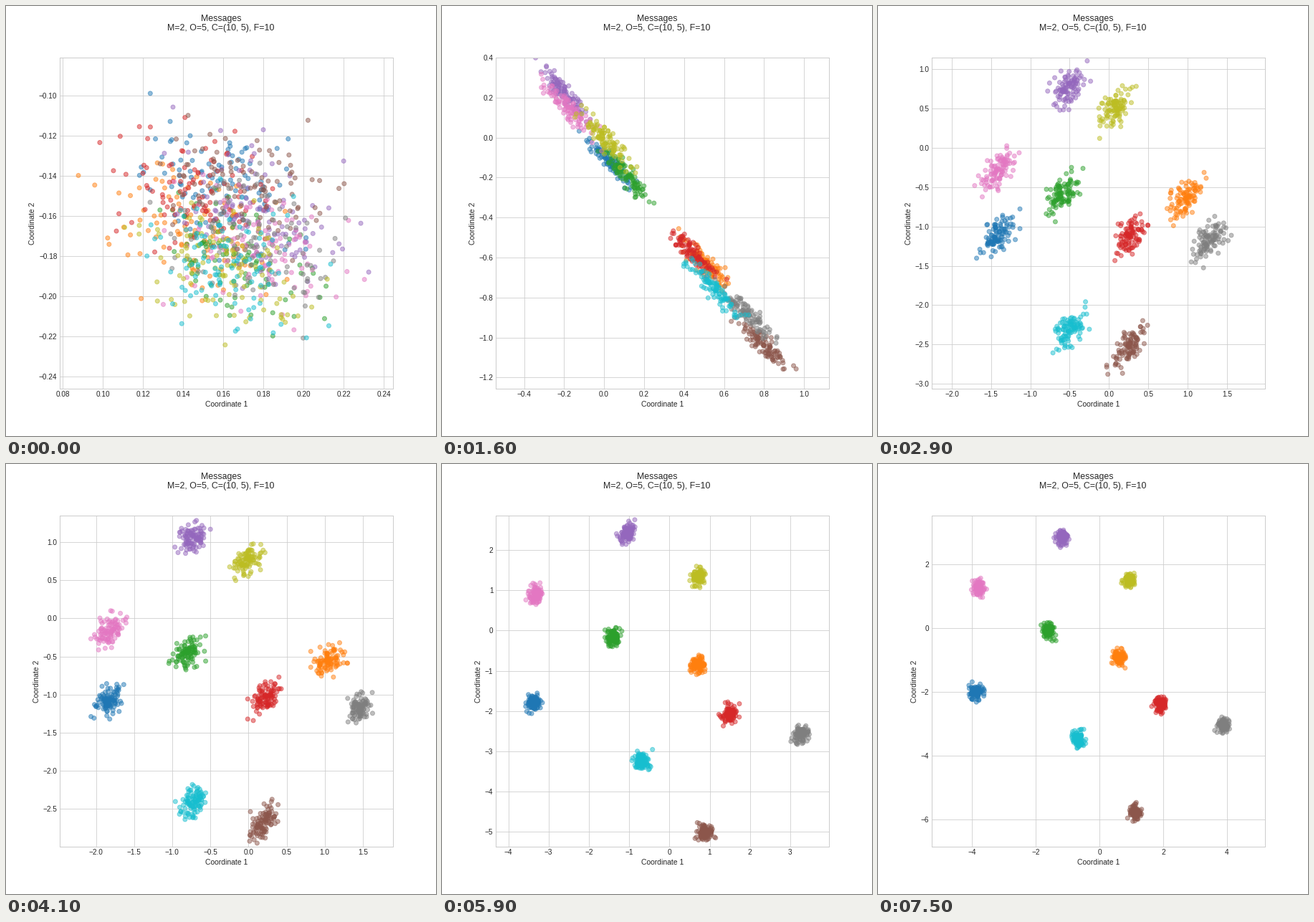
A matplotlib script for the animation above (7600 ms loop, 600x600 px).

```python
import numpy as np
import matplotlib.pyplot as plt
from matplotlib.animation import FuncAnimation

plt.rcParams.update({
    "font.family": "Liberation Sans",
    "font.size": 10,
    "text.color": ".15",
    "axes.labelcolor": ".15",
    "axes.labelsize": 10.4,
    "axes.edgecolor": ".8",
    "axes.linewidth": 1,
    "axes.axisbelow": True,
    "axes.grid": True,
    "grid.color": ".8",
    "grid.linewidth": 0.8,
    "xtick.color": ".15",
    "ytick.color": ".15",
    "xtick.major.size": 0,
    "ytick.major.size": 0,
    "xtick.major.pad": 2.6,
})

FRAMES, INTERVAL = 76, 100
PER_CLASS = 100
HALF = np.array([232.5, 231.0])   # half of the axes size in pixels
SPREAD, LATE, END = 29, 41, 75    # clusters apart, clusters tight, last step

# step, pixels per unit, view centre, cluster sd x, sd y (pixels), correlation
STAGES = np.array([
    (0, 2800, .16149, -.16357, 55, 46, -.3),
    (8, 2344, .22470, -.28622, 26, 36, -.6),
    (16, 279, .2917, -.4276, 17, 18, -.9),
    (SPREAD, 109.65, -.1350, -.9571, 11.5, 14, .55),
    (LATE, 106.4, -.2895, -.8224, 9.5, 10.5, .4),
    (59, 56.2, -.1744, -1.2545, 5.3, 6.3, .2),
    (END, 44.4, -.0360, -1.6644, 4.3, 5.3, 0),
])

# Linear maps that fold the spread layout into a band and then a single cloud:
# step, offset from the view centre (pixels), 2x2 matrix by rows
FOLDS = np.array([
    (0, -3, -2, 0, 0, 0, 0),
    (8, -31, 24, .38, -.18, -.37, .37),
    (16, -3, 12, .63, -.63, -.70, .82),
    (SPREAD, -3, 11, 1, 0, 0, 1),
    (LATE, -1, 5.5, 1.18, 0, 0, 1.09),
])

# Cluster centres in data units, in colour order
APART = np.array([(-1.42, -1.13), (.95, -.66), (-.58, -.58), (.27, -1.1), (-.52, .77),
                  (.25, -2.54), (-1.43, -.31), (1.27, -1.19), (.06, .49), (-.51, -2.32)])
FINAL = np.array([(-3.88, -2), (.61, -.93), (-1.6, -.08), (1.9, -2.4), (-1.17, 2.86),
                  (1.12, -5.8), (-3.8, 1.25), (3.88, -3.05), (.95, 1.5), (-.66, -3.5)])

# Where each class leans inside the first cloud
LEAN = np.radians([100, 180, -65, 135, 15, 70, -30, -35, -95, -90])
RING = 55 * np.column_stack([np.cos(LEAN), np.sin(LEAN)])


def track(table, n):
    return [np.interp(n, table[:, 0], col) for col in table.T[1:]]


def view(n):
    units = np.interp(n, STAGES[:, 0], 1 / STAGES[:, 1])   # data units per pixel
    _, x, y, *shape = track(STAGES, n)
    return units, np.array([x, y]), shape


def centres(n):
    if n > LATE:
        start = centres(LATE)
        return start + (FINAL - start) * np.interp(n, [LATE, 59, END], [0, .75, 1])
    units, mid, _ = view(n)
    dx, dy, *fold = track(FOLDS, n)
    layout = (APART - APART.mean(axis=0)) * STAGES[3, 1]
    pixels = layout @ np.reshape(fold, (2, 2)).T + RING * max(0, 1 - n / 8)
    return mid + (pixels + (dx, dy)) * units


def scatter_noise(n, sx, sy, rho):
    """A fresh batch of messages around every cluster, in pixels."""
    rng = np.random.default_rng(100 + n)
    a, b = np.clip(rng.standard_normal((2, 10, PER_CLASS)), -2.7, 2.7)
    return np.stack([sx * a, sy * (rho * a + np.sqrt(1 - rho ** 2) * b)], axis=-1)


fig, ax = plt.subplots(figsize=(25 / 3, 25 / 3), dpi=72, facecolor="white")
fig.subplots_adjust(left=.125, right=.9, bottom=.11, top=.88)
fig.suptitle("Messages\nM=2, O=5, C=(10, 5), F=10", fontsize=12.4, linespacing=1.12)
ax.set_xlabel("Coordinate 1")
ax.set_ylabel("Coordinate 2")

colors = np.repeat(plt.get_cmap("tab10").colors, PER_CLASS, axis=0)
dots = ax.scatter(*np.zeros((2, 10 * PER_CLASS)), c=colors, alpha=.5)


def update(n):
    units, mid, shape = view(n)
    low, high = mid - HALF * units, mid + HALF * units
    ax.set_xlim(low[0], high[0])
    ax.set_ylim(low[1], high[1])
    pts = centres(n)[:, None] + scatter_noise(n, *shape) * units
    dots.set_offsets(pts.reshape(-1, 2))
    return dots,


anim = FuncAnimation(fig, update, frames=FRAMES, interval=INTERVAL,
                     repeat=True, repeat_delay=0)
plt.show()
```
